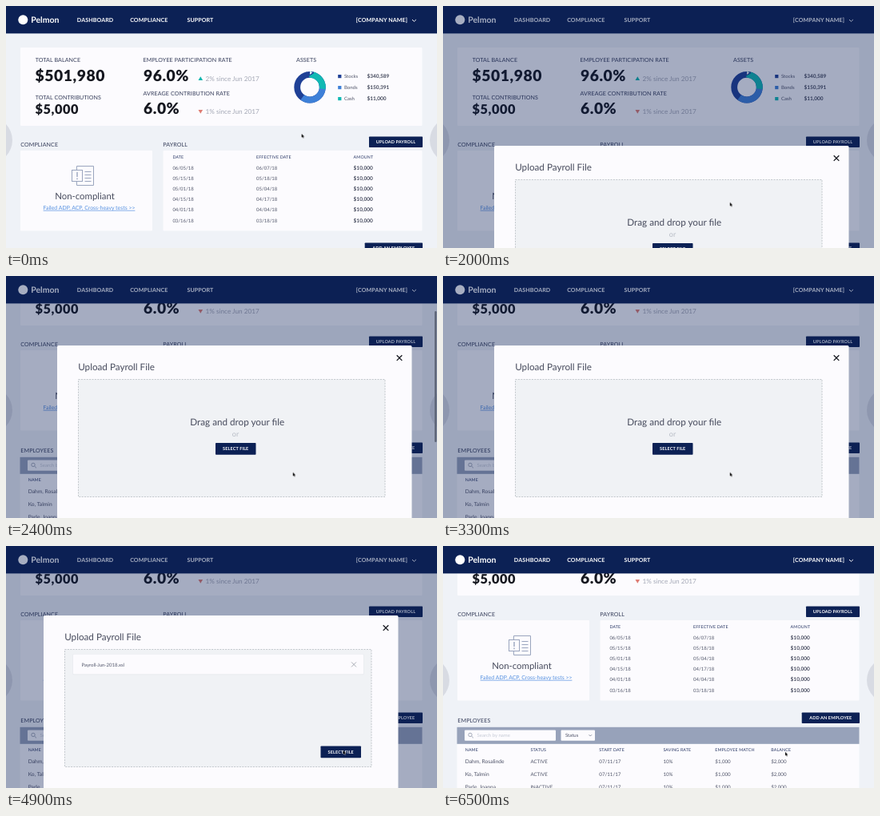
An HTML page that plays this animation: 539x303 px, repeating every 6700 ms.

```html
<!DOCTYPE html>
<html lang="en">
<head>
<meta charset="utf-8">
<title>Payroll upload</title>
<style>
html, body { margin: 0; width: 100%; height: 100%; overflow: hidden; background: #eff2f7; }
svg { display: block; width: 100vw; height: 100vh; }
text { font: 6px Lato, "Open Sans", sans-serif; fill: #505569; text-rendering: geometricPrecision; white-space: pre; }
.label { font-size: 7.1px; letter-spacing: .1px; fill: #343c59; }
.head { font-size: 5.3px; letter-spacing: .15px; fill: #2a3866; }
.nav { font-size: 7.1px; font-weight: 700; letter-spacing: .1px; fill: #fff; }
.brand { font-size: 10.5px; font-weight: 700; fill: #fff; }
.big { font-size: 19.3px; font-weight: 900; letter-spacing: .55px; fill: #15171f; }
.mid { font-size: 16.3px; font-weight: 900; letter-spacing: .55px; fill: #15171f; }
.since { font-size: 8.2px; fill: #a5a9b6; }
.value { font-size: 6.5px; font-weight: 700; fill: #44495c; }
.title { font-size: 11.7px; fill: #474b5d; }
.link { font-size: 6.9px; fill: #5590e0; text-decoration: underline; }
.person { font-size: 6.7px; }
.cell { font-size: 6.2px; }
.or { font-size: 9px; fill: #b6bbc5; }
.hint { fill: #c6cbd6; }
.button { font-size: 5.5px; font-weight: 700; letter-spacing: .12px; fill: #fff; }
.middle { text-anchor: middle; }
.navy { fill: #0c2155; }
.card { fill: #fcfbfe; }
.line { fill: none; stroke-width: 1; }
.side { fill: #d8dbe3; }
.donut { fill: none; stroke-width: 7.8; }

.scroll, .bar, .dim, .dialog, .shift, .empty, .filled, .cursor { animation: 6.7s linear infinite; }
.scroll { animation-name: scroll; }
.bar { animation-name: bar; }
.bar rect { animation: thumb 6.7s linear infinite; }
.dim, .dialog { animation-name: show; }
.shift { animation-name: shift; }
.empty { animation-name: empty; }
.filled { animation-name: filled; }
.cursor { animation-name: cursor; }

@keyframes scroll {
  0%, 31.4% { transform: translateY(0); animation-timing-function: ease-out; }
  35.7%, 100% { transform: translateY(-88px); }
}
@keyframes thumb {
  0%, 31.4% { transform: translateY(0); animation-timing-function: ease-out; }
  35.7%, 100% { transform: translateY(44px); }
}
@keyframes bar {
  0%, 31.4% { opacity: 0; }
  32.8%, 42% { opacity: 1; }
  46.2%, 100% { opacity: 0; }
}
@keyframes show {
  0%, 23.9% { opacity: 0; }
  27.6%, 89.5% { opacity: 1; }
  94%, 100% { opacity: 0; }
}
@keyframes shift {
  0%, 55.2% { transform: translateX(0); animation-timing-function: step-end; }
  55.21%, 100% { transform: translateX(-17px); }
}
@keyframes empty {
  0%, 55.2% { opacity: 1; animation-timing-function: step-end; }
  55.21%, 100% { opacity: 0; }
}
@keyframes filled {
  0%, 55.2% { opacity: 0; animation-timing-function: step-end; }
  55.21%, 100% { opacity: 1; }
}
@keyframes cursor {
  0%, 10.5% { transform: translate(369.6px, 160px); animation-timing-function: ease-in-out; }
  19.4% { transform: translate(459px, 187.5px); }
  22.4%, 23.9% { transform: translate(485px, 169px); animation-timing-function: ease-in-out; }
  29.1%, 55.2% { transform: translate(358.7px, 245.8px); animation-timing-function: step-end; }
  55.21%, 65% { transform: translate(293.6px, 216px); animation-timing-function: ease-in-out; }
  74.6%, 100% { transform: translate(427.9px, 257.8px); }
}
</style>
</head>
<body>
<svg viewBox="0 0 539 303" preserveAspectRatio="none">
  <rect width="539" height="303" fill="#eff2f7"/>

  <g class="scroll">
    <rect class="card" x="18" y="52" width="502.5" height="98" rx="1"/>
    <text class="label" x="36.7" y="70.3">TOTAL BALANCE</text>
    <text class="big" x="36.6" y="93.5">$501,980</text>
    <text class="label" x="36.7" y="116.6">TOTAL CONTRIBUTIONS</text>
    <text class="mid" x="36.6" y="134.5">$5,000</text>
    <text class="label" x="171.6" y="70.3">EMPLOYEE PARTICIPATION RATE</text>
    <text class="big" x="172" y="93.5">96.0%</text>
    <path d="M240.5 93 L243.3 88.3 L246.1 93Z" fill="#10b6ae"/>
    <text class="since" x="249.6" y="93.6">2% since Jun 2017</text>
    <text class="label" x="171.6" y="111.8">AVREAGE CONTRIBUTION RATE</text>
    <text class="big" x="172" y="135">6.0%</text>
    <path d="M240.5 130 L243.3 134.7 L246.1 130Z" fill="#df7d74"/>
    <text class="since" x="249.6" y="135.2">1% since Jun 2017</text>
    <text class="label" x="363" y="70.3">ASSETS</text>
    <g id="assets"></g>

    <text class="label" x="18.3" y="176.3">COMPLIANCE</text>
    <rect class="card" x="18" y="181" width="165" height="100.5" rx="1"/>
    <g class="line" stroke="#9aa5be">
      <path d="M88.5 200.5h21v24h-21z M98.5 207.5h8 M98.5 211.5h8 M98.5 215.5h8 M98.5 219.5h8"/>
      <rect class="card" x="82.5" y="205.5" width="13" height="14"/>
      <path d="M89 208v6 M89 215.6v1.6" stroke-width="1.4"/>
    </g>
    <text class="title middle" x="98.5" y="241.8" style="font-size:11.4px">Non-compliant</text>
    <text class="link middle" x="104" y="254.8">Failed ADP, ACP, Cross-heavy tests &gt;&gt;</text>

    <text class="label" x="196.3" y="176.3">PAYROLL</text>
    <rect class="card" x="196.5" y="181" width="324" height="100.5" rx="1"/>
    <g id="payroll"></g>

    <text class="label" x="18.3" y="309.3">EMPLOYEES</text>
    <rect class="card" x="17.5" y="336" width="503" height="90"/>
    <rect x="17.5" y="314.8" width="503" height="21" fill="#97a2ba"/>
    <rect class="card" x="27" y="318.5" width="114" height="13.3" rx="1"/>
    <g class="line" stroke="#a4abba">
      <circle cx="34" cy="324.4" r="2.2"/>
      <path d="M35.6 326 L38 328.4"/>
    </g>
    <text class="hint" x="42.5" y="327.3">Search by name</text>
    <rect class="card" x="147.5" y="318.5" width="42.5" height="13.3" rx="1"/>
    <text x="153" y="327.3">Status</text>
    <path class="line" d="M182.6 324.3l1.7 1.7l1.7-1.7" stroke="#8a90a0"/>
    <g id="employees"></g>
    <g id="pageButtons"></g>
  </g>

  <rect class="navy" width="539" height="34.4"/>
  <circle cx="21.3" cy="17.2" r="6" fill="#fff"/>
  <text class="brand" x="31.2" y="21.2">Pelmon</text>
  <text class="nav" x="88.8" y="20.3">DASHBOARD</text>
  <text class="nav" x="155.2" y="20.3">COMPLIANCE</text>
  <text class="nav" x="226.4" y="20.3">SUPPORT</text>
  <text class="nav" x="437.8" y="20.3">[COMPANY NAME]</text>
  <path class="line" d="M508 17l2.4 2.4l2.4-2.4" stroke="#fff"/>
  <circle class="side" cx="-21" cy="168" r="29"/>
  <circle class="side" cx="559" cy="168" r="29"/>

  <rect class="navy dim" width="539" height="303" fill-opacity=".36"/>

  <g class="scroll"><g class="dialog"><g class="shift">
    <rect class="card" x="64" y="175" width="443.5" height="239" rx="1.5"/>
    <text class="title" x="90.2" y="206">Upload Payroll File</text>
    <path class="line" d="M488.7 187.3l6.6 6.6m0-6.6l-6.6 6.6" stroke="#15171f" style="stroke-width:1.3"/>
    <rect x="90.5" y="217.5" width="383.5" height="147" fill="#f0f2f5" stroke="#b5bbc0" stroke-width=".8" stroke-dasharray="2 1.4"/>
    <g class="empty">
      <text class="title middle" x="289.2" y="275.2">Drag and drop your file</text>
      <text class="or middle" x="287" y="289">or</text>
      <g id="emptyButton"></g>
    </g>
    <g class="filled">
      <rect x="100.6" y="223.6" width="363.8" height="25.6" rx="1" fill="#e4e7eb"/>
      <rect class="card" x="101" y="223.8" width="363" height="24.6" rx="1"/>
      <text x="111.5" y="238.8">Payroll-Jun-2018.xsl</text>
      <path class="line" d="M449 233.4l6 6m0-6l-6 6" stroke="#a9adb5"/>
      <g id="filledButton"></g>
    </g>
  </g></g></g>

  <g class="bar"><rect x="536" y="0" width="2.6" height="164" rx="1.3" fill="#5f6779"/></g>
  <path class="cursor" d="M0 0v4.7l1.1-1 .8 1.9 .9-.4-.8-1.8h1.5z" fill="#111" stroke="#fff" stroke-width=".5" paint-order="stroke"/>
</svg>
<script>
const fill = (id, parts) => { document.getElementById(id).innerHTML = parts.flat().join(''); };
const text = (cls, x, y, s) => `<text class="${cls}" x="${x}" y="${y}">${s}</text>`;
const button = (x, y, w, h, s) =>
  `<rect class="navy" x="${x}" y="${y}" width="${w}" height="${h}" rx=".8"/>` +
  text('button middle', x + w / 2, y + h / 2 + 2, s);
const row = (cells, xs, y, cls) => cells.map((s, i) => text(cls(i), xs[i], y, s));

// Later segments overlap earlier ones, so no seams show between them.
const assets = [
  ['Stocks', '$340,589', '#1f4096', 0, 100],
  ['Bonds', '$150,391', '#3e80d8', 20, 40],
  ['Cash', '$11,000', '#10b9b3', 2, 25]
];
fill('assets', assets.map(([name, value, color, start, share], i) => {
  const y = 86 + i * 14;
  return `<circle class="donut" cx="380" cy="101.7" r="15.8" pathLength="100" stroke="${color}"
    stroke-dasharray="${share + ' ' + (share < 100 ? 100 - share : 0)}" transform="rotate(${start * 3.6 - 90} 380 101.7)"/>
    <rect x="415.2" y="${y}" width="4.2" height="4.2" fill="${color}"/>` +
    text('', 423, y + 4.2, name) + text('value', 451.4, y + 4.3, value);
}));

const payX = [208.4, 313, 434.6];
const payDates = [
  ['06/05/18', '06/07/18'], ['05/15/18', '05/18/18'], ['05/01/18', '05/04/18'],
  ['04/15/18', '04/17/18'], ['04/01/18', '04/04/18'], ['03/16/18', '03/18/18']
];
fill('payroll', [
  row(['DATE', 'EFFECTIVE DATE', 'AMOUNT'], payX, 191, () => 'head'),
  ...payDates.map((dates, i) =>
    row([...dates, '$10,000'], payX, 205 + i * 13.1, c => c === 2 ? 'value' : ''))
]);

const staffX = [27.7, 109.4, 195.3, 275.4, 340.3, 410.2];
const staff = [['Dahm, Rosalinde', 'ACTIVE'], ['Ko, Talmin', 'ACTIVE'], ['Parle, Joanna', 'INACTIVE']];
fill('employees', [
  row(['NAME', 'STATUS', 'START DATE', 'SAVING RATE', 'EMPLOYEE MATCH', 'BALANCE'], staffX, 345.4, () => 'head'),
  ...staff.map((who, i) =>
    row([...who, '07/11/17', '10%', '$1,000', '$2,000'], staffX, 360.3 + i * 16, c => c ? 'cell' : 'person'))
]);

fill('pageButtons', [
  button(454, 163.5, 67, 13.5, 'UPLOAD PAYROLL'),
  button(448.7, 296.5, 72.3, 13.5, 'ADD AN EMPLOYEE')
]);
fill('emptyButton', [button(262, 297, 50.5, 14.8, 'SELECT FILE')]);
fill('filledButton', [button(410.5, 338.4, 50.5, 14.8, 'SELECT FILE')]);
</script>
</body>
</html>
```
